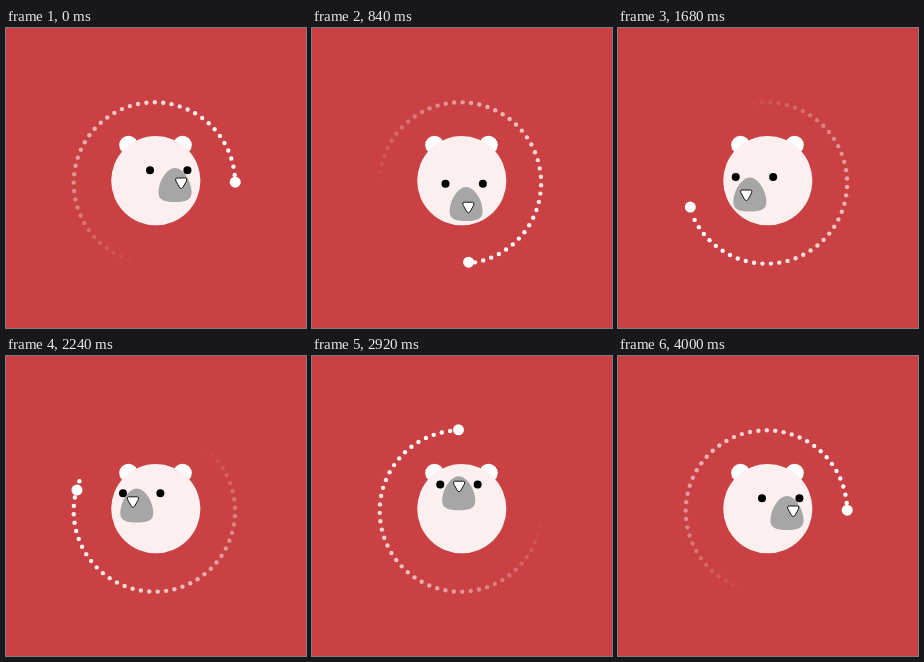
Animation of 300 by 300 pixels, one loop 4.04 s. Source, as an HTML page:

```html
<!DOCTYPE html>
<html lang="en">
<head>
<meta charset="utf-8">
<title>Bear loader</title>
<style>
  html, body { margin: 0; width: 100%; height: 100%; overflow: hidden; background: #c94142; }
  svg { display: block; width: 100vw; height: 100vh; }
</style>
</head>
<body>
<svg viewBox="0 0 300 300">
  <g id="trail" fill="#fff"></g>
  <circle id="lead" r="5.5" fill="#fff"/>
  <g fill="#fff">
    <circle cx="122.5" cy="117" r="9.3"/>
    <circle cx="176.5" cy="117" r="9.3"/>
  </g>
  <circle cx="149.8" cy="152.7" r="44.6" fill="#fbefef"/>
  <path id="snout" fill="#a6a6a6"
    d="M0-17C8-17 16.5-4 16.5 7.5C16.5 15 11 17 0 17C-11 17-16.5 15-16.5 7.5C-16.5-4-8-17 0-17Z"/>
  <g id="eyes">
    <circle cx="-18.7" r="4"/>
    <circle cx="18.7" r="4"/>
  </g>
  <path id="nose" fill="#fff" stroke="#000" stroke-width=".9"
    d="M-4.2-5H4.2Q6.6-5 5.3-2L1.6 4.6Q0 6.6-1.6 4.6L-5.3-2Q-6.6-5-4.2-5Z"/>
</svg>
<script>
const LOOP = 4040, STEP = 40, TURN = 4000;
const DOTS = 60, GAP = 360 / DOTS, FADE = 257, AHEAD = 4.5;   // angles in degrees
const stops = [0, 1000, 1965, 3010, 4000];   // times at which the lead dot reaches each quarter
const $ = id => document.getElementById(id);

function place(el, cx, cy, r, deg) {
  const a = deg * Math.PI / 180;
  const x = cx + r * Math.cos(a), y = cy + r * Math.sin(a);
  el.setAttribute('transform', `translate(${x.toFixed(2)} ${y.toFixed(2)})`);
}

const dots = Array.from({ length: DOTS }, () => {
  const el = document.createElementNS('http://www.w3.org/2000/svg', 'circle');
  el.setAttribute('r', 2.2);
  $('trail').append(el);
  return el;
});

function leadAngle(t) {
  let q = 0;
  while (q < 3 && t >= stops[q + 1]) q++;
  const u = (t - stops[q]) / (stops[q + 1] - stops[q]);
  return (q + (1 - Math.cos(Math.PI * u)) / 2) * 90;
}

function draw(t) {
  const a = t / TURN * 360;
  place($('lead'), 148.8, 154.2, 80.4, leadAngle(t));
  place($('snout'), 149.2, 156.9, 19.8, a);
  place($('eyes'), 148.7, 142.3, 14, a);
  place($('nose'), 150.2, 155, 25, a);

  // the whole ring creeps on by one gap per turn
  const drift = 0.3 + GAP * t / TURN;
  dots.forEach((el, k) => {
    const deg = k * GAP + drift;
    const lag = (a - deg + AHEAD + 720) % 360 - AHEAD;
    place(el, 148.4, 155, 80.7, deg);
    el.setAttribute('opacity', lag < FADE ? 1 - (Math.max(lag, 0) / FADE) ** 1.5 : 0);
  });
}

const start = performance.now();
function tick() {
  const t = (performance.now() - start) % LOOP;
  draw(Math.floor(t / STEP) * STEP);
  requestAnimationFrame(tick);
}
tick();
</script>
</body>
</html>
```
